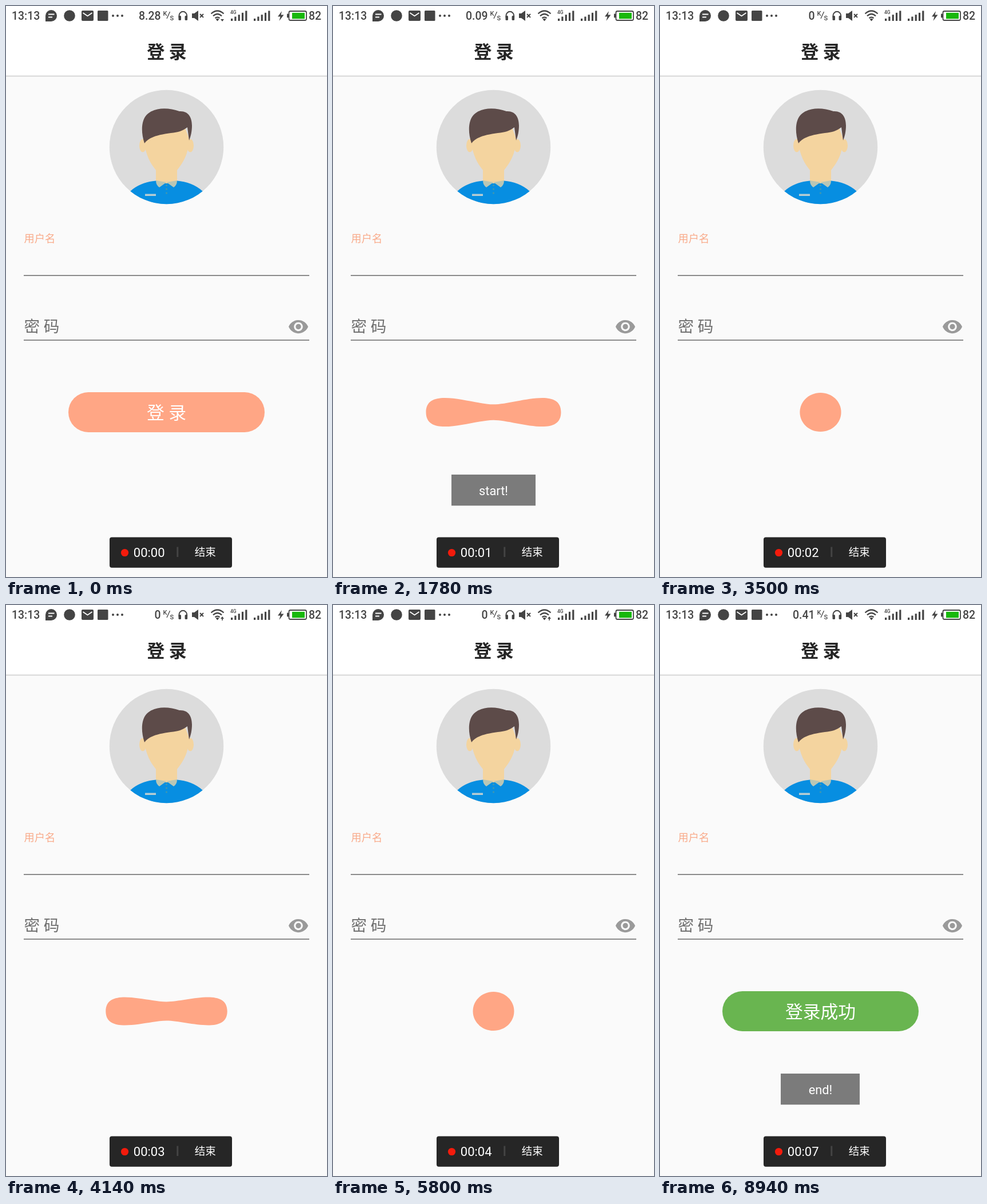
An HTML page for the animation above (8.96 s loop, 561 px wide and 998 px high).

```html
<!DOCTYPE html>
<html lang="zh">
<head>
<meta charset="utf-8">
<style>
html, body { margin: 0; width: 100%; height: 100%; overflow: hidden; background: #fafafa; }
svg { display: block; width: 561px; height: 998px; }
text { font-family: Roboto, "Noto Sans CJK SC", "Noto Sans CJK", sans-serif; white-space: pre; }
.status text { font-weight: 500; font-size: 19.4px; fill: #444; }
.mid { text-anchor: middle; }
</style>
</head>
<body>
<svg viewBox="0 0 561 998" xmlns="http://www.w3.org/2000/svg">
  <defs><clipPath id="round"><circle cx="280.5" cy="246.5" r="99.7"/></clipPath></defs>
  <rect width="561" height="998" fill="#fafafa"/>
  <rect width="561" height="122" fill="#fff"/>
  <rect y="121.6" width="561" height="1.8" fill="#d3d3d3"/>

  <g class="status" fill="#444">
    <text x="10" y="24">13:13</text>
    <path d="M69 27V17A10 10 0 1 1 79 27Z"/>
    <path d="M74 14.5H84.500M74 19.500H81" stroke="#fff" stroke-width="2"/>
    <circle cx="111" cy="17" r="9.800"/>
    <rect x="132" y="8" width="21" height="18" rx="2"/>
    <path d="M134.500 12L142.500 17.500L150.500 12" fill="none" stroke="#fff" stroke-width="1.800"/>
    <rect x="160" y="8" width="18.500" height="18" rx="1.500"/>
    <circle cx="187" cy="17" r="2"/><circle cx="195" cy="17" r="2"/><circle cx="203" cy="17" r="2"/>
    <text id="speed" x="270.500" y="24" text-anchor="end"></text>
    <text x="274.500" y="17" style="font-size:11px">K</text>
    <path d="M281 22L286.500 10" stroke="#444" stroke-width="1.300"/>
    <text x="286.500" y="25" style="font-size:11px">S</text>
    <path d="M302.500 20V17A6.800 7.300 0 0 1 316.100 17V20" fill="none" stroke="#444" stroke-width="2"/>
    <rect x="301.500" y="17" width="4.500" height="8" rx="1.500"/>
    <rect x="312.600" y="17" width="4.500" height="8" rx="1.500"/>
    <path d="M325 13H329L336 8V26L329 21H325Z"/>
    <path d="M339 14L345 20M345 14L339 20" stroke="#444" stroke-width="2"/>
    <g fill="none" stroke="#444" stroke-width="2.300">
      <path d="M358.500 13.500Q369.500 3.500 380.500 13.500M362 17.500Q369.500 10.500 377 17.500M365.500 21.300Q369.500 18 373.500 21.300"/>
    </g>
    <path d="M366.500 23L369.500 26.500L372.500 23Q369.500 21 366.500 23Z"/>
    <path id="down" d="M375 23H381L378 27Z"/>
    <path id="up" d="M375 24H377.200V27H378.800V24H381L378 20Z"/>
    <text x="392" y="14" style="font-size:8.500px">4G</text>
    <g id="bars"></g>
    <path d="M482 9L475 18.500H479.500L477.500 26L485.500 15.500H480.500Z"/>
    <rect x="494.500" y="9" width="30.500" height="16" rx="2.500" fill="none" stroke="#444" stroke-width="1.800"/>
    <rect x="491" y="13.500" width="3" height="7" rx="1"/>
    <rect x="500" y="11.800" width="22" height="10.600" fill="#18b80c"/>
    <text x="529" y="24">82</text>
  </g>

  <text class="mid" x="281" y="90.500" font-size="31" font-weight="700" fill="#262626">登 录</text>

  <g clip-path="url(#round)">
    <rect x="180" y="146" width="201" height="201" fill="#dcdcdc"/>
    <ellipse cx="239" cy="244" rx="6" ry="11.500" fill="#f4d49f"/>
    <ellipse cx="322" cy="244" rx="6" ry="11.500" fill="#f4d49f"/>
    <path d="M241 236L252 205H310L320 232C319 254 314 268 299 287V309L280.500 318L262 309V287C248 270 244 255 241 236Z" fill="#f4d49f"/>
    <path d="M242 240C235 219 237 199 246 190C259 177 283 177 303 184C319 183 325 195 325 209C325 219 323 228 320 235L317 212C309 218 301 221 288 222C266 225 250 229 242 240Z" fill="#5d4b49"/>
    <path d="M217 324C231 311 247 307 262 305.500C268 307 273 310 280.500 310C288 310 293 307 299 305.500C315 307 331 312 344 324V348H217Z" fill="#078ee1"/>
    <path d="M264 305H297L280.500 309Z" fill="#f4d49f"/>
    <path d="M262 305L280.500 308L268 317Q262 313 262 305ZM299 305L280.500 308L293 317Q299 313 299 305Z" fill="#b9c6b5"/>
    <rect x="243" y="328.500" width="19" height="3.500" fill="#b8cdd2"/>
    <g fill="#3b96b5"><circle cx="280.500" cy="313.500" r="1.700"/><circle cx="280.500" cy="320" r="1.700"/><circle cx="280.500" cy="327" r="1.700"/></g>
  </g>

  <text x="31.500" y="413" font-size="18.300" fill="#f9ab8b">用户名</text>
  <rect x="31" y="470.200" width="499" height="1.600" fill="#707070"/>
  <text x="31.500" y="570" font-size="27.600" font-weight="350" fill="#6f6f6f">密 码</text>
  <rect x="31" y="583.200" width="499" height="1.600" fill="#707070"/>
  <path transform="translate(492.400 541.900) scale(1.550)" fill="#9a9a9a" d="M12 4.500C7 4.500 2.730 7.610 1 12c1.730 4.390 6 7.500 11 7.500s9.270-3.110 11-7.500c-1.730-4.390-6-7.500-11-7.500zM12 17c-2.760 0-5-2.240-5-5s2.240-5 5-5 5 2.240 5 5-2.240 5-5 5zm0-8c-1.660 0-3 1.340-3 3s1.340 3 3 3 3-1.340 3-3-1.340-3-3-3z"/>

  <path id="button"/>
  <text id="label" class="mid" x="280.500" y="722" font-size="30.800" font-weight="350" fill="#fff"></text>

  <g id="toast">
    <rect id="toastBox" y="819" height="54.300" fill="#7b7b7b"/>
    <text id="toastText" class="mid" x="280.500" y="855" font-size="21.800" fill="#fff"></text>
  </g>

  <g id="recorder">
    <rect x="181" y="928.500" width="214" height="53.300" rx="4" fill="#262626"/>
    <circle cx="207.500" cy="955.500" r="6.600" fill="#f41b0c"/>
    <text id="clock" x="222.800" y="962.600" font-size="22" fill="#fff"></text>
    <rect x="298.300" y="945.500" width="3" height="17.500" fill="#444"/>
    <text x="329.800" y="960.800" font-size="18.500" fill="#fff">结束</text>
  </g>
</svg>
<script>
const LOOP = 8960, CX = 280.5, CY = 710;
const PILL = 171.5, DOT = 36, STRETCH = 121, CYCLE = 1190;
const SHRINK = 790, GROW = 6812, MORPH = 353;
const PEAKS = [1646, 2852, 3982, 5180, 6384];
const ORANGE = '#ffa685', GREEN = '#69b550';
const $ = id => document.getElementById(id);
const ramp = (t, from, to) => Math.min(1, Math.max(0, (t - from) / (to - from)));
const ease = x => (1 - Math.cos(Math.PI * x)) / 2;
const show = (id, on) => $(id).setAttribute('opacity', +on);

// two sets of signal bars
$('bars').innerHTML = [393, 433].map(x0 => [0, 1, 2, 3, 4].map(i => {
  const h = 4 + i * 3.4;
  return `<rect x="${x0 + i * 6.3}" y="${26 - h}" width="3.2" height="${h}"/>`;
}).join('')).join('');

// k = 1 is the full button, k = 0 the round one
function pill(k) {
  const hw = DOT + (PILL - DOT) * k, r = 34 + Math.min(1, k * 4), x = hw - r;
  return `M${CX - x} ${CY - r}H${CX + x}A${r} ${r} 0 0 1 ${CX + x} ${CY + r}H${CX - x}A${r} ${r} 0 0 1 ${CX - x} ${CY - r}Z`;
}

// p = 0 is a disc, p = 1 a long shape with a thin waist
function blob(p) {
  const e = STRETCH * p, hw = DOT + e, waist = 34 - 0.248 * e;
  const kx = 20 + 0.2 * e, ky = 19 + 0.34 * e;
  const at = (x, y) => `${CX + x} ${CY + y} `;
  return 'M' + at(0, -waist) +
    'C' + at(kx, -waist) + at(hw, -ky) + at(hw, 0) +
    'C' + at(hw, ky) + at(kx, waist) + at(0, waist) +
    'C' + at(-kx, waist) + at(-hw, ky) + at(-hw, 0) +
    'C' + at(-hw, -ky) + at(-kx, -waist) + at(0, -waist) + 'Z';
}

function pulse(t) {
  const d = Math.min(...PEAKS.map(m => Math.abs(t - m)));
  return d < CYCLE / 2 ? Math.cos(Math.PI * d / CYCLE) ** 6 : 0;
}

function drawButton(t) {
  let d;
  if (t < SHRINK + MORPH) d = pill(1 - ease(ramp(t, SHRINK, SHRINK + MORPH)));
  else if (t < GROW) d = blob(pulse(t));
  else d = pill(ease(ramp(t, GROW, GROW + MORPH)));
  $('button').setAttribute('d', d);
  $('button').setAttribute('fill', t < GROW ? ORANGE : GREEN);
  $('label').textContent = t < SHRINK ? '登 录' : t < GROW + MORPH ? '' : '登录成功';
}

function drawToast(t) {
  const late = t > 5000, w = late ? 138 : 147;
  const alpha = late ? ramp(t, 7090, 7200) ** 0.95 * (t < 7200 ? 0.9 : 1)
                     : ramp(t, 830, 1000) * (1 - ramp(t, 3260, 3480));
  $('toastBox').setAttribute('x', late ? 211 : 207);
  $('toastBox').setAttribute('width', w);
  $('toastText').textContent = late ? 'end!' : 'start!';
  $('toast').setAttribute('opacity', alpha);
}

function draw(t) {
  drawButton(t);
  drawToast(t);
  $('speed').textContent = t < 450 ? '8.28' : t < 3300 ? '0.09' : t < 6700 ? '0' : '0.41';
  show('down', t < 450);
  show('up', t >= 3640 && t < 6150);
  const dim = ramp(t, 6040, 6260) - ramp(t, 8580, 8800);
  $('recorder').setAttribute('opacity', 1 - dim / 2);
  $('clock').textContent = '00:0' + Math.floor(t * 0.85 / 1000);
}

const start = performance.now();
function tick() {
  draw((performance.now() - start) % LOOP);
  requestAnimationFrame(tick);
}
draw(0);
requestAnimationFrame(tick);
</script>
</body>
</html>
```
